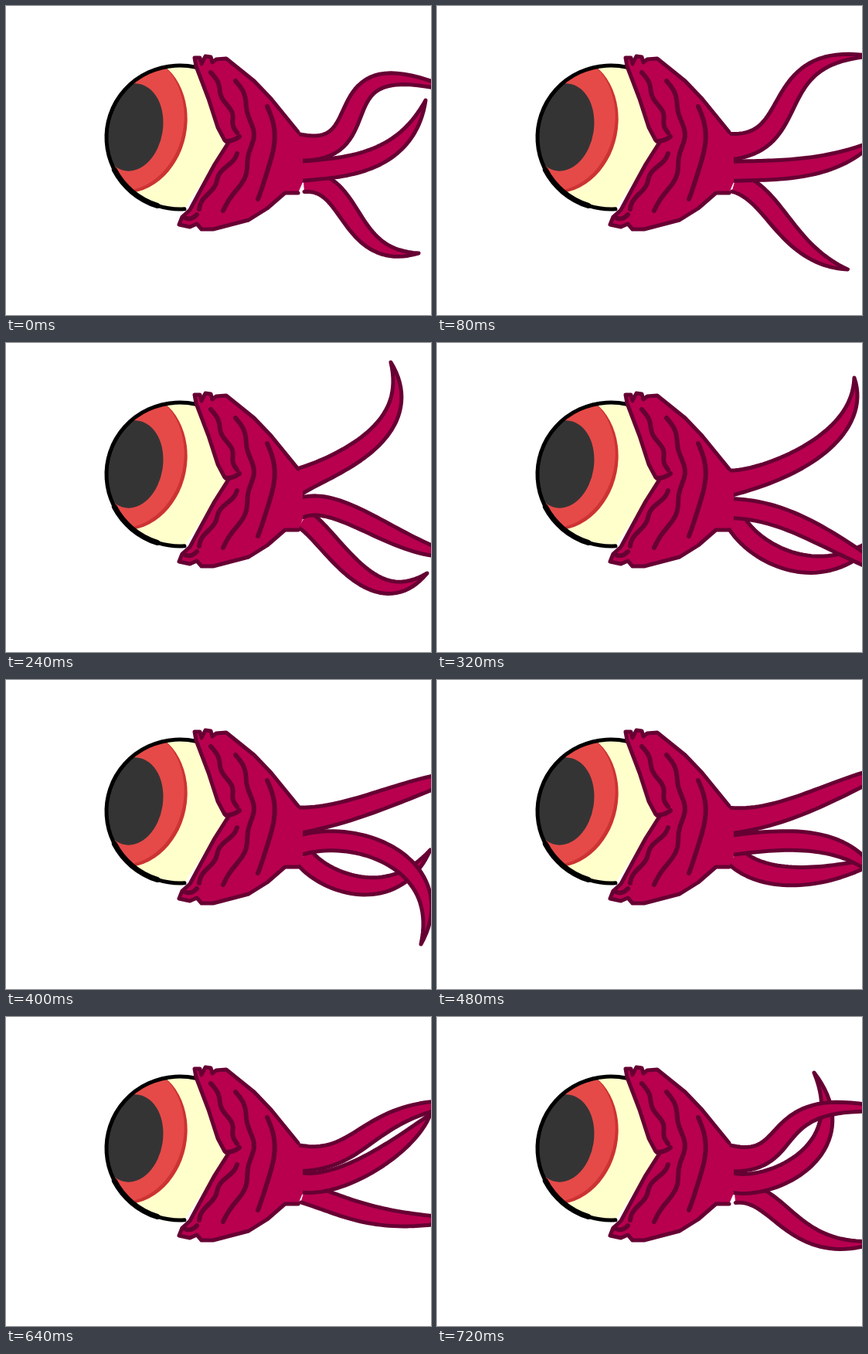
Recreate the animation shown at these times as an HTML page with a canvas. Size 550x400 px, loop 0.8 s.

```html
<!DOCTYPE html>
<html lang="en">
<head>
<meta charset="utf-8">
<title>Swimming eye</title>
<style>
  html, body { margin: 0; width: 100%; height: 100%; overflow: hidden; background: #fff; }
  canvas { display: block; }
</style>
</head>
<body>
<canvas id="stage" width="550" height="400"></canvas>
<script>
const ctx = document.getElementById('stage').getContext('2d');
ctx.lineCap = ctx.lineJoin = 'round';
const FLESH = '#b8004f', EDGE = '#660033', STEP = 80;

const points = text => text.split(' ').map(p => p.split(',').map(Number));

function trace(pts) {
  const path = new Path2D();
  pts.forEach(p => path.lineTo(...p));
  return path;
}
function fill(path, color) {
  ctx.fillStyle = color;
  ctx.fill(path);
}
function stroke(path, color, width) {
  ctx.strokeStyle = color;
  ctx.lineWidth = width;
  ctx.stroke(path);
}
function ellipse(x, y, rx, ry, tilt = 0, from = 0, to = 2 * Math.PI) {
  const path = new Path2D();
  path.ellipse(x, y, rx, ry, tilt, from, to);
  return path;
}

// Eye: the iris and pupil are tilted ellipses clipped by the ball.
const eyeArc = (from, to) => ellipse(225, 170, 95, 93, 0, from * Math.PI, to * Math.PI);
const rim = eyeArc(0.48, 1.57);
const ball = new Path2D(rim);
ball.lineTo(289, 175);

function drawEye() {
  fill(ball, '#ffffcc');
  ctx.save();
  ctx.clip(ball);
  const iris = ellipse(160, 153, 74, 90, 0.2);
  fill(iris, '#cc3333');
  ctx.clip(iris);
  fill(ellipse(156, 150, 74, 90, 0.2), '#e54a48');
  fill(ellipse(163, 157, 40, 57, 0.15), '#353435');
  ctx.restore();
  stroke(rim, '#000', 5);
  stroke(eyeArc(0.6, 0.85), '#000', 7);
}

// Hood
const hoodEdge = trace(points('378,163 343,120 321,97 285,68 272,69 267,73 265,66 258,65 253,75 ' +
  '251,67 244,67 246,78 262,120 274,157 283,174 289,175 270,205 252,238 238,264 228,273 ' +
  '224,283 238,286 247,282 253,289 268,289 314,277 338,262 361,242 378,242'));
const hood = new Path2D(hoodEdge);
hood.lineTo(384, 228);
hood.lineTo(384, 190);

// A bent line with a slight wobble.
function wrinkle(from, bend, to, waves) {
  const line = [];
  for (let t = 0; t <= 1.001; t += 0.04) {
    const [x, y] = [0, 1].map(k =>
      (1 - t) ** 2 * from[k] + 2 * t * (1 - t) * bend[k] + t * t * to[k]);
    line.push([x + 2.5 * Math.sin(t * waves * 2 * Math.PI), y]);
  }
  return trace(line);
}
const wrinkles = [
  wrinkle([265, 86], [290, 131], [299, 164], 2),
  wrinkle([297, 97], [347, 179], [281, 265], 3),
  wrinkle([338, 130], [358, 190], [326, 250], 1),
  wrinkle([299, 191], [272, 223], [250, 263], 2),
  wrinkle([285, 175], [294, 175], [302, 169], 0),
  wrinkle([230, 273], [238, 279], [247, 270], 0)
];

// Each arm is a cubic through its root and three points at equal parameters, the last its tip.
const roots = [[372, 182], [380, 214], [385, 228]];
const pose = (...arms) => arms.map((text, i) => [roots[i], ...points(text)]);

const curled = pose('440,156 474,102 600,118', '440,207 500,183 543,122', '432,252 468,300 534,320');
const spread = pose('434,147 472,84 526,12', '440,217 510,222 595,224', '425,267 470,312 529,362');
const sinking = pose('434,153 493,103 498,25', '440,220 512,254 590,275', '427,270 480,312 545,298');
const crossing = pose('440,164 513,118 540,45', '450,228 520,262 610,312', '428,270 500,286 580,242');
const hooked = pose('450,167 530,140 620,115', '464,214 531,258 537,342', '424,257 487,265 549,220');
const trailing = pose('450,171 525,137 610,95', '440,202 510,179 610,180', '440,245 515,237 620,232');
const gathering = pose('436,166 482,126 610,126', '442,206 497,158 488,72', '435,247 487,284 575,290');

const between = (from, to) => from.map((arm, i) =>
  arm.map((p, j) => p.map((v, k) => (v + to[i][j][k]) / 2)));

const cycle = [curled, between(curled, spread), spread, sinking, crossing, hooked,
  between(hooked, trailing), trailing, between(trailing, gathering), gathering];

function pointOn(arm, t) {
  const u = 3 * t;
  const weights = [0, 1, 2, 3].map(i => [0, 1, 2, 3].reduce((w, j) =>
    j === i ? w : w * (u - j) / (i - j), 1));
  return [0, 1].map(k => arm.reduce((sum, p, i) => sum + p[k] * weights[i], 0));
}

function drawArm(arm, flare) {
  const upper = [], lower = [];
  for (let i = 0; i <= 40; i++) {
    const t = i / 40, [x, y] = pointOn(arm, t);
    const [ax, ay] = pointOn(arm, t - 0.01), [bx, by] = pointOn(arm, t + 0.01);
    const half = 12.5 * (1 - t ** 4) + flare * (1 - t) ** 6;
    const scale = half / Math.hypot(bx - ax, by - ay);
    const nx = (by - ay) * scale, ny = (ax - bx) * scale;
    upper.push([x + nx, y + ny]);
    lower.unshift([x - nx, y - ny]);
  }
  const outline = trace([...upper, ...lower]);
  fill(outline, FLESH);
  stroke(outline, EDGE, 5);
}

function draw(now) {
  ctx.fillStyle = '#fff';
  ctx.fillRect(0, 0, 550, 400);
  drawEye();

  const [top, middle, low] = cycle[Math.floor(now / STEP) % cycle.length];
  drawArm(low, 0);
  drawArm(middle, 0);
  drawArm(top, 5);

  fill(hood, FLESH);
  stroke(hoodEdge, EDGE, 5);
  wrinkles.forEach(line => stroke(line, EDGE, 6));
  requestAnimationFrame(draw);
}
draw(0);
</script>
</body>
</html>
```
